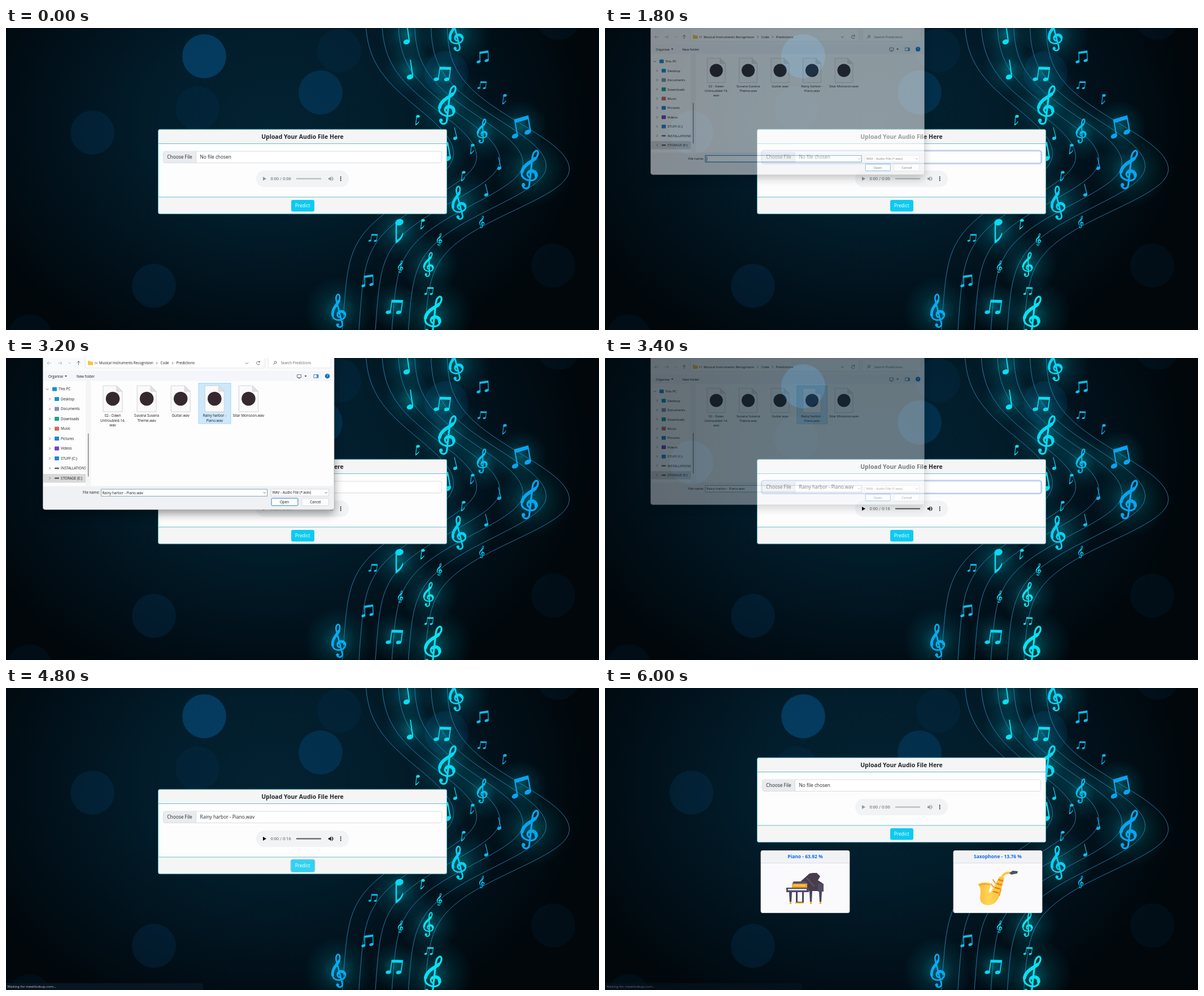
An HTML page for the animation above (6200 ms loop, 1050 px wide and 534 px high).

```html
<!DOCTYPE html>
<html lang="en">
<head>
<meta charset="utf-8">
<title>Audio upload</title>
<style>
html, body { margin: 0; width: 100%; height: 100%; overflow: hidden; background: #000508; }
svg { display: block; width: 100%; height: 100%; }
text { font-family: "Open Sans", "Noto Sans", sans-serif; font-size: 8.35px; fill: #212529; white-space: pre; }
.mid { text-anchor: middle; }
.title { font-weight: 700; font-size: 10.46px; }
.result { font-weight: 700; font-size: 8.45px; fill: #0d6bea; }
.time { font: 7.6px Roboto, sans-serif; fill: #5f6163; }
.dialog text, .status text { font-size: 6.25px; fill: #1b1b1b; }
.dialog .soft { fill: #666; }
.status text { fill: #c3c8cc; font-size: 6.15px; }
.line { fill: none; stroke: #555; stroke-width: .8; }

.empty, .chosen, .hover, .ring-in, .ring, .dialog, .file-hover, .file-picked, .caret,
.lit, .pressed, .status, .results, .card { animation: 6.2s step-end infinite; }
.chosen, .hover, .ring-in, .ring, .file-hover, .file-picked, .lit, .pressed, .results { visibility: hidden; }
.dialog { opacity: 0; transform-origin: 323px 122px; filter: drop-shadow(0 7px 8px rgba(0,0,0,.4)); }
.status { opacity: 0; }

.empty { animation-name: empty; }
.chosen { animation-name: chosen; }
.hover { animation-name: hover; }
.ring-in { animation-name: ring-in; }
.ring { animation-name: ring; }
.dialog { animation-name: dialog; }
.file-hover { animation-name: file-hover; }
.file-picked { animation-name: file-picked; }
.caret { animation-name: caret; }
.lit { animation-name: lit; }
.pressed { animation-name: pressed; }
.status { animation-name: status; }
.results { animation-name: results; }
.card { animation-name: lift; }

@keyframes empty { 54.83% { visibility: hidden } 90.32% { visibility: visible } }
@keyframes chosen { 54.83% { visibility: visible } 90.32% { visibility: hidden } }
@keyframes hover { 19.35% { visibility: visible } 32.25% { visibility: hidden } }
@keyframes ring-in { 25.8% { visibility: visible } 29.03% { visibility: hidden } }
@keyframes ring { 29.03% { visibility: visible } 32.25% { visibility: hidden } 54.83% { visibility: visible } 74.19% { visibility: hidden } }
@keyframes dialog {
  29.03% { opacity: .55; transform: scale(.94) }
  32.25% { opacity: 1; transform: none }
  54.83% { opacity: .4; transform: scale(.94) }
  58.06% { opacity: 0; transform: none }
}
@keyframes file-hover { 38.7% { visibility: visible } 45.16% { visibility: hidden } }
@keyframes file-picked { 45.16% { visibility: visible } 58.06% { visibility: hidden } }
@keyframes caret { 45.16% { visibility: hidden } 58.06% { visibility: visible } }
@keyframes lit { 70.96% { visibility: visible } 90.32% { visibility: hidden } }
@keyframes pressed { 74.19% { visibility: visible } 90.32% { visibility: hidden } }
@keyframes status { 77.41% { opacity: 1 } 96.77% { opacity: .5 } }
@keyframes results { 90.32% { visibility: visible } }
@keyframes lift { 90.32% { transform: translateY(-56px) } }
</style>
</head>
<body>
<svg viewBox="0 0 1050 534">
  <defs>
    <radialGradient id="night" gradientUnits="userSpaceOnUse" cx="470" cy="170" r="570" gradientTransform="translate(0 34) scale(1 .8)">
      <stop offset="0" stop-color="#032232"/><stop offset=".4" stop-color="#021c2a"/>
      <stop offset=".75" stop-color="#010f18"/><stop offset="1" stop-color="#01070b"/>
    </radialGradient>
    <radialGradient id="glow">
      <stop offset="0" stop-color="#00c8dc" stop-opacity=".38"/>
      <stop offset=".5" stop-color="#009cb4" stop-opacity=".14"/>
      <stop offset="1" stop-color="#0090b0" stop-opacity="0"/>
    </radialGradient>
    <linearGradient id="brass"><stop offset="0" stop-color="#ffb52e"/><stop offset=".4" stop-color="#ffd657"/><stop offset="1" stop-color="#f9bd30"/></linearGradient>
    <clipPath id="pane"><path d="M66 41h75v186H66z"/></clipPath>

    <g id="clef" fill="none" stroke="currentColor" stroke-linecap="round">
      <path stroke-width="4.5" d="M-10 41C-8 52 8 50 6 38L-3 -30C-5 -45 4 -52 7 -46C12 -36 4 -25 -6 -14C-18 -2 -23 8 -18 18C-13 31 17 31 18 14C19 2 4 -2 -3 6C-8 12 -4 18 0 19"/>
      <path stroke-width="8" d="M4 -28C-1 -20 -20 -8 -19 11M17 12C15 1 3 1 -2 7"/>
      <circle cx="-8" cy="41" r="4" fill="currentColor"/>
    </g>
    <g id="pair" fill="currentColor">
      <ellipse cx="-34" cy="39" rx="17" ry="11" transform="rotate(-18 -34 39)"/>
      <ellipse cx="31" cy="31" rx="17" ry="11" transform="rotate(-18 31 31)"/>
      <path d="M-25 -42L48 -50V31H42V-31L-19 -24V39H-25Z"/>
    </g>
    <g id="quarter" fill="currentColor">
      <ellipse cy="35" rx="16" ry="12" transform="rotate(-20 0 35)"/>
      <path d="M-5 -50H0L16 31H10Z"/>
    </g>
    <g id="flag" fill="currentColor">
      <ellipse cx="-1" cy="-36" rx="17" ry="13" transform="rotate(-15 -1 -36)"/>
      <path d="M-17 -34h6V36C2 31 7 18 14 5C18 20 4 38 -13 50H-17Z"/>
    </g>
    <g id="sheet">
      <path d="M-17 49H7L17 59V95H-17Z" fill="#fafafa" stroke="#c9c9c9" stroke-width=".8"/>
      <path d="M7 49V59H17Z" fill="#e1e1e1" stroke="#c9c9c9" stroke-width=".6"/>
      <circle cy="72" r="12.300" fill="#35292f"/>
    </g>
    <g id="player" fill="currentColor">
      <path d="M455 263l6 3.500l-6 3.500zM571 265h2l2.500-2.500v8l-2.500-2.500h-2z"/>
      <path d="M577 264.500q1.500 2 0 4M577 262.700q4.500 3.800 0 7.600" fill="none" stroke="currentColor"/>
    </g>
    <path id="choose" d="M336.500 218.400V238.100H281.500q-2.600 0-2.600-2.600V221q0-2.600 2.600-2.600z"/>
  </defs>

  <rect width="1050" height="534" fill="url(#night)"/>
  <g id="bokeh" fill="#075f9c"></g>
  <g id="staff" fill="none" stroke="#2b87b9" stroke-width=".85"></g>
  <g id="notes"></g>

  <g class="card">
    <rect x="269.500" y="179.300" width="511" height="149.400" rx="3" fill="#fdfdfd"/>
    <path d="M269.500 204.500v-22q0-3 3-3h505q3 0 3 3v22zM269.500 299v26.500q0 3 3 3h505q3 0 3-3V299z" fill="#f5f5f6"/>
    <path d="M270 204.500H780M270 299H780" stroke="#68bfcd"/>
    <rect x="269.500" y="179.300" width="511" height="149.400" rx="3" fill="none" stroke="#58bccb"/>
    <text class="mid title" x="525" y="196">Upload Your Audio File Here</text>

    <rect class="ring-in" x="277.500" y="217.300" width="495" height="22" rx="3.500" fill="none" stroke="#a9c9f5" stroke-width="1.500"/>
    <rect class="ring" x="277.300" y="217" width="495.500" height="22.500" rx="4" fill="none" stroke="#b9d2f8" stroke-width="3"/>
    <rect x="278.500" y="218" width="493" height="20.500" rx="3" fill="#fff" stroke="#ced4da" stroke-width=".8"/>
    <use href="#choose" fill="#e9ecef"/>
    <use href="#choose" class="hover" fill="#dde0e3"/>
    <path d="M336.500 218V238.500" stroke="#ced4da" stroke-width=".8"/>
    <text x="285.300" y="231.300">Choose File</text>
    <text class="empty" x="343.500" y="231.300">No file chosen</text>
    <text class="chosen" x="343.500" y="231.300">Rainy harbor - Piano.wav</text>

    <rect x="443" y="252" width="164" height="29" rx="14.500" fill="#f1f3f4"/>
    <g class="empty">
      <text class="time" x="468.500" y="269.200">0:00 / 0:00</text>
      <use href="#player" color="#939596"/>
      <path d="M514 266.500H558" stroke="#b3b5b6" stroke-width="1.800"/>
    </g>
    <g class="chosen">
      <text class="time" x="468.500" y="269.200">0:00 / 0:16</text>
      <use href="#player" color="#000"/>
      <path d="M514 266.500H558" stroke="#555" stroke-width="1.800"/>
    </g>
    <path d="M592.700 263.500v.01m0 3v.01m0 3v.01" stroke="#111" stroke-width="2" stroke-linecap="round"/>

    <rect class="pressed" x="503.500" y="302.500" width="44" height="23.500" rx="4.500" fill="#95ccd7"/>
    <rect x="505" y="304" width="41" height="20.500" rx="3" fill="#0dcaf0"/>
    <rect class="lit" x="505" y="304" width="41" height="20.500" rx="3" fill="#31d2f2"/>
    <text class="mid" x="525.200" y="317.200" style="fill:#fff">Predict</text>
  </g>

  <g class="results">
    <g id="panel">
      <rect x="276" y="287.500" width="157" height="110" rx="3" fill="#fafafc" stroke="#dedee2" stroke-width=".8"/>
      <path d="M276.400 309.500v-18.600q0-3 3-3h150.200q3 0 3 3v18.600z" fill="#f1f2f4"/>
      <path d="M276 309.500h157" stroke="#d9dade" stroke-width=".8"/>
    </g>
    <use href="#panel" x="341"/>
    <text class="mid result" x="354.500" y="301.300">Piano - 63.92 %</text>
    <text class="mid result" x="695.500" y="301.300">Saxophone - 13.76 %</text>

    <path d="M342 346L362 328L368 327H375L381 333L377 340L385 345V359H342Z" fill="#483d4c"/>
    <path d="M357 336L371 351" stroke="#685970" stroke-width="1.500"/>
    <path d="M334 342h22l4 5h-29z" fill="#5b5064"/>
    <path d="M331 346h27v8h-27z" fill="#f7a824"/>
    <path d="M334 349h20" stroke="#ffd265" stroke-width="1.500"/>
    <path d="M321 353h40v8h-40zM377 346h10v14h-10z" fill="#514c65"/>
    <path d="M324 356.500h33" stroke="#edf0f4" stroke-width="2.500"/>
    <path d="M326 361h5l-1 18h-3zM362 359h5l-1 20h-3zM379 360h5l-1 19h-3zM338 361h3v17h8V361h3v20h-14z" fill="#49445d"/>
    <path d="M327 378h3v4h-3zM363 378h3v4h-3zM380 378h3v4h-3zM337 379h15v2h-15z" fill="#f7a824"/>

    <path d="M660 347Q672 341 685 346Q680 353 680 362Q684 362 687 354L699 333L707 336L698 368Q692 384 678 384Q661 383 665 364Q666 352 660 347Z" fill="url(#brass)"/>
    <path d="M664 348Q673 345 681 348" stroke="#f49a1e" stroke-width="2" fill="none"/>
    <path d="M703 335Q706 325 719 327" fill="none" stroke="#ffc837" stroke-width="4"/>
    <path d="M716 327L722 323L731 324L730 328L719 330Z" fill="#505565"/>
    <path d="M697 339l7 2M694 346l8 2M691 353l8 2M688 360l8 2" stroke="#ee7c20" stroke-width="2.600" stroke-linecap="round"/>
    <path d="M687 339l4 6M684 347l4 5M701 356l-3 11" stroke="#f49a1e" stroke-width="2" stroke-linecap="round"/>
  </g>

  <g class="dialog">
    <rect x="65.500" y="-20" width="515.500" height="288" rx="4" fill="#fdfdfd" stroke="#a7adb2" stroke-width=".8"/>
    <path d="M66 -19h514.500v42H66z" fill="#f8fafc"/>
    <path d="M66 23h514.500v18H66z" fill="#f4f6fb"/>
    <path d="M66 226.500h514.500V264q0 3.500-3.500 3.500H69.500Q66 267.500 66 264z" fill="#f0f1f4"/>
    <path d="M140.500 -5V17.500H458V-5M464.500 -5V17.500H575V-5" fill="#fff" stroke="#e1e4e8" stroke-width=".8"/>
    <path class="line" d="M80 9h-7m3-3l-3 3l3 3M92 9h7m-3-3l3 3l-3 3M110.500 8l2 2l2-2" opacity=".5"/>
    <path class="line" d="M128.500 12.500v-7m-3 3l3-3l3 3"/>
    <path d="M145 5h3l1 1.500h5v6h-9z" fill="#f6c343"/>
    <path class="line" d="M159 7l-2 2l2 2m3-4l-2 2l2 2M266 7l2 2l-2 2M294 7l2 2l-2 2M424 8l2.500 2.500l2.500-2.500"/>
    <path class="line" d="M449 7a3 3 0 1 0 .5 3M449.500 5v2.500h-2.500"/>
    <circle class="line" cx="477" cy="8" r="2"/><path class="line" d="M475.500 9.500l-2.500 2.500"/>
    <text x="165" y="11.200">Musical Instruments Recognision</text>
    <text x="273.500" y="11.200">Code</text>
    <text x="301.500" y="11.200">Predictions</text>
    <text class="soft" x="486.500" y="11.200">Search Predictions</text>
    <text x="75" y="34.700">Organise</text>
    <text x="125" y="34.700">New folder</text>
    <path d="M104 31h4l-2 2.500zM528.500 31h4l-2 2.500z" fill="#333"/>
    <path class="line" d="M515.500 29.500h7v5h-7zM517 36h4"/>
    <path d="M545 29.500h8v5.500h-8z" fill="#fff" stroke="#456" stroke-width=".8"/><path d="M550 30h3v5h-3z" fill="#2f9be0"/>
    <circle cx="569" cy="32" r="4.300" fill="#1373bd"/>
    <text class="mid" x="569" y="34.200" style="fill:#fff">?</text>

    <path d="M141 41h9.500v185H141z" fill="#f5f5f6"/>
    <path d="M145.700 134V209" stroke="#858585" stroke-width="1.500" stroke-linecap="round"/>
    <path d="M66 205h75v15.500H66z" fill="#d9d9d9"/>
    <g id="places" clip-path="url(#pane)"></g>

    <rect class="file-hover" x="341" y="44.500" width="57" height="71.500" fill="#e5f3ff"/>
    <rect class="file-picked" x="341" y="44.500" width="57" height="71.500" fill="#cde8fc" stroke="#99cdf3" stroke-width=".8"/>
    <g id="files"></g>

    <text x="136" y="240.300">File name:</text>
    <rect x="168.500" y="232" width="294" height="12.300" fill="#fff" stroke="#7599b5" stroke-width=".9"/>
    <g class="caret">
      <rect x="168.500" y="232" width="294" height="12.300" fill="none" stroke="#1c83c9"/>
      <path d="M171.300 234v8.500" stroke="#111" stroke-width=".8"/>
    </g>
    <text class="file-picked" x="170.500" y="240.600">Rainy harbor - Piano.wav</text>
    <rect x="469.500" y="232" width="102" height="12" fill="#fff" stroke="#d1d3d6" stroke-width=".8"/>
    <text x="471.500" y="240.400">WAV - Audio File (*.wav)</text>
    <path class="line" d="M455.500 237l2.300 2.300l2.300-2.300M564.500 237l2.300 2.300l2.300-2.300"/>
    <rect x="470" y="248" width="47" height="13" rx="1.500" fill="#fdfdfd" stroke="#1479bd" stroke-width=".9"/>
    <rect x="524" y="248" width="47.500" height="13" rx="1.500" fill="#fdfdfd" stroke="#cfd1d4" stroke-width=".8"/>
    <text class="mid" x="493" y="256.700">Open</text>
    <text class="mid" x="548" y="256.700">Cancel</text>
  </g>

  <g class="status">
    <path d="M0 522H346q3 0 3 3v9H0z" fill="#091622"/>
    <text x="2.500" y="530.200">Waiting for meetlookup.com...</text>
  </g>
</svg>
<script>
const fill = (id, parts) => document.getElementById(id).innerHTML = parts.join("");
const mix = (a, b, t) => a + (b - a) * t;

// Blurred discs: a bright one, then fainter and fainter groups.
const discs = [
  [[351, 50]],
  [[557, 114]],
  [[153, 185], [262, 456], [780, 80]],
  [[969, 420], [978, -18], [42, 545], [339, 142], [590, 40]]
];
fill("bokeh", discs.flatMap((group, rank) => group.map(([x, y]) =>
  `<circle cx="${x}" cy="${y}" r="39" opacity="${.46 * .58 ** rank}"/>`)));

// Each staff line is a slanted base with one bell-shaped bulge to the right.
const staffX = (t, y) => {
  const fromPeak = y - mix(225, 252, t);
  const width = fromPeak < 0 ? 118 : 100;
  return mix(633, 779, t) - y * .07 + mix(175, 236, t) * Math.exp(-((fromPeak / width) ** 2));
};
const lineCount = 6;
fill("staff", Array.from({ length: lineCount }, (_, i) => {
  const points = Array.from({ length: 90 }, (_, k) => `${staffX(i / (lineCount - 1), k * 6).toFixed(1)} ${k * 6}`);
  return `<path d="M${points.join("L")}"/>`;
}));

const noteGroups = [
  { shape: "clef", size: 72, tilt: 14, at: [[783, 136], [929, 250], [758, 508]] },
  { shape: "clef", size: 60, tilt: -7, at: [[797, 11], [802, 309], [589, 500]] },
  { shape: "clef", size: 44, tilt: 6, at: [[844, 182], [749, 418]] },
  { shape: "clef", size: 22, tilt: 6, at: [[843, 343], [768, 374], [699, 422]] },
  { shape: "pair", size: 36, tilt: -10, at: [[911, 175], [769, 222]] },
  { shape: "pair", size: 28, tilt: 8, at: [[773, 81], [688, 493]] },
  { shape: "pair", size: 22, tilt: -2, at: [[844, 51], [640, 447]] },
  { shape: "pair", size: 15, tilt: 8, at: [[843, 101], [650, 371], [749, 465]] },
  { shape: "quarter", size: 36, tilt: 3, at: [[716, 74], [710, 12]] },
  { shape: "quarter", size: 23, tilt: -3, at: [[795, 187], [873, 240], [850, 287]] },
  { shape: "flag", size: 43, tilt: 0, at: [[697, 359]] },
  { shape: "flag", size: 19, tilt: 6, at: [[729, 163], [883, 126], [826, 214], [810, 262], [738, 347]] }
];
// Cyan near the middle of the staff, bluer towards the sides.
const noteColor = x => `hsl(${mix(182, 200, Math.min(1, Math.abs(x - 740) / 170))} 95% 49%)`;
const allNotes = noteGroups.flatMap(group => group.at.map(([x, y]) => ({ ...group, x, y })));
fill("notes", [
  ...allNotes.filter(n => n.size > 26).map(n =>
    `<circle cx="${n.x}" cy="${n.y}" r="${28 + n.size * .55}" fill="url(#glow)"/>`),
  ...allNotes.map(n =>
    `<use href="#${n.shape}" color="${noteColor(n.x)}" transform="translate(${n.x} ${n.y}) rotate(${n.tilt}) scale(${n.size / 100})"/>`)
]);

const places = {
  "This PC": "#1d8fd0", "Desktop": "#1593c9", "Documents": "#8196a8", "Downloads": "#16a394", "Music": "#d2685f",
  "Pictures": "#2382d0", "Videos": "#7742be", "STUFF (C:)": "#2b88cc", "INSTALLATIONS": "#565a5d", "STORAGE (E:)": "#565a5d"
};
fill("places", Object.entries(places).map(([name, color], i) => {
  const y = 55 + i * 17.5;
  const indent = i ? 4 : 0;
  const height = i < 8 ? 7 : 2.5;
  const arrow = i ? `M76.5 ${y - 2}l2 2l-2 2` : `M71 ${y - 1}l2.2 2.2l2.2-2.2`;
  return `<path class="line" d="${arrow}"/>
    <rect x="${82 + indent}" y="${y - height / 2}" width="8" height="${height}" rx="1" fill="${color}"/>
    <text x="${93 + indent}" y="${y + 2.3}">${name}</text>`;
}));

const files = [
  ["02 - Dawn", "Untroubled-14.", "wav"], ["Suvana Suvana", "Theme.wav"], ["Guitar.wav"],
  ["Rainy harbor -", "Piano.wav"], ["Sitar Monsoon.wav"]
];
fill("files", files.map((rows, i) => {
  const x = 189 + i * 60.1;
  return `<use href="#sheet" x="${x}"/>` +
    rows.map((row, k) => `<text class="mid" x="${x}" y="${104.3 + k * 8.4}">${row}</text>`).join("");
}));
</script>
</body>
</html>
```
